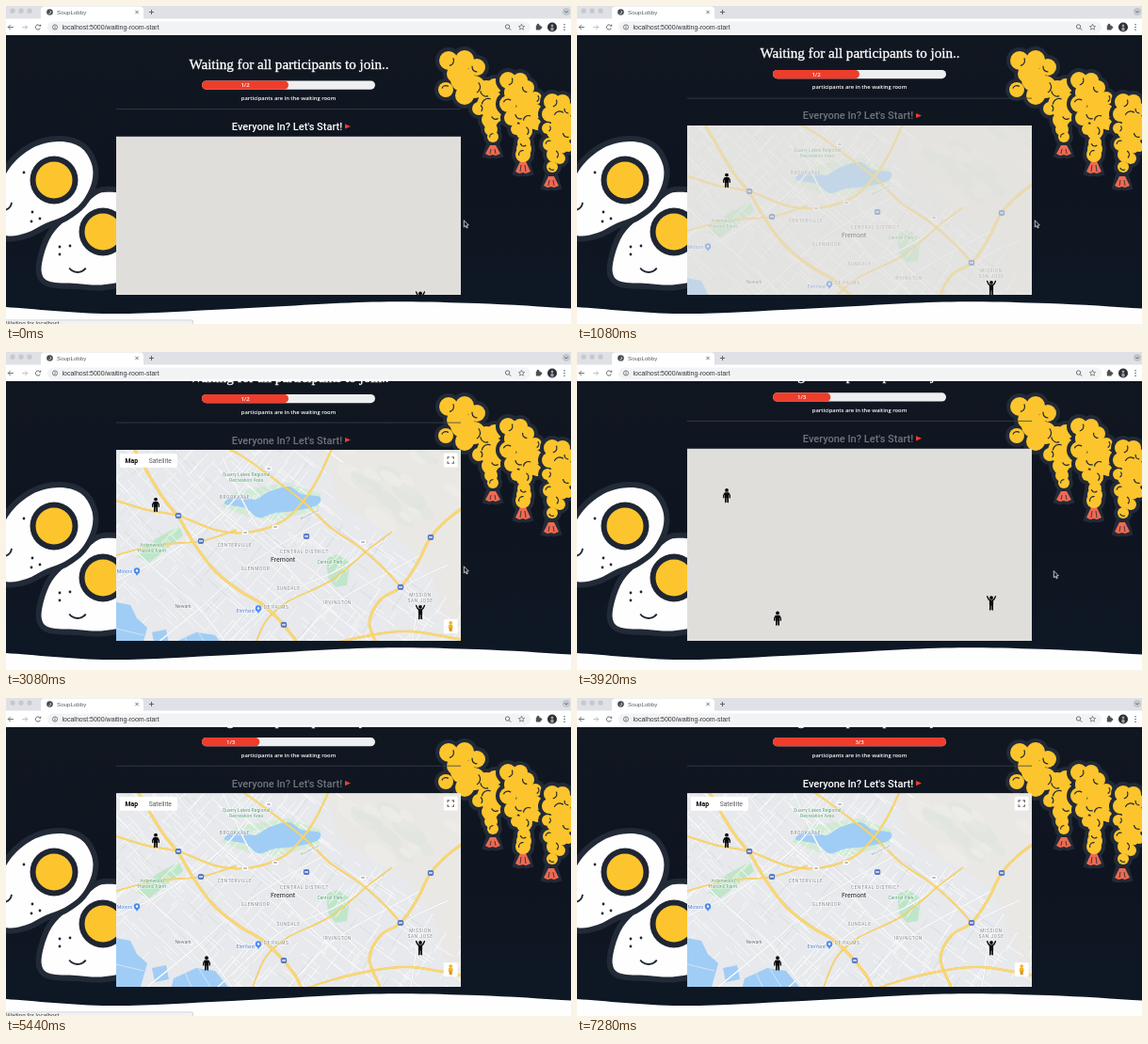
These frames come from a looping animation (600x338 px, 7.32 s). An HTML page with a canvas:

```html
<!DOCTYPE html>
<html lang="en">
<head>
<meta charset="utf-8">
<title>Waiting room</title>
<style>
html, body { margin: 0; width: 100%; height: 100%; overflow: hidden; background: #0f1621; }
canvas { display: block; width: 600px; height: 338px; }
</style>
</head>
<body>
<canvas id="stage"></canvas>
<script>
const W = 600, H = 338, LOOP = 7320, TAU = Math.PI * 2;
const DPR = Math.max(1, window.devicePixelRatio || 1);
const SANS = '"Liberation Sans", Arial, sans-serif';
const ROBOTO = 'Roboto, Arial, sans-serif';
const OPEN = '"Open Sans", sans-serif';
const SERIF = '"Liberation Serif", "Times New Roman", serif';
const INK = '#1f2633', YOLK = '#fcc52d', RED = '#ee3d2c', CORAL = '#ee6a52';

function surface(canvas, w, h) {
  canvas.width = w * DPR;
  canvas.height = h * DPR;
  const c = canvas.getContext('2d');
  c.scale(DPR, DPR);
  return c;
}
const stage = document.getElementById('stage');
const screen = surface(stage, W, H);
let g = screen;

const clamp = v => Math.min(1, Math.max(0, v));
const ease = v => v * v * (3 - 2 * v);

function track(keys, t) {
  let i = keys.length - 1;
  while (i > 0 && keys[i][0] > t) i--;
  const a = keys[i], b = keys[i + 1];
  return b ? a[1] + (b[1] - a[1]) * ease((t - a[0]) / (b[0] - a[0])) : a[1];
}

function seeded(s) {
  return () => (s = (s * 16807) % 2147483647) / 2147483647;
}

// Catmull-Rom curve through a flat list of coordinates.
function curve(p, closed) {
  const n = p.length / 2, path = new Path2D();
  const at = i => {
    const k = closed ? (i + n) % n : Math.min(n - 1, Math.max(0, i));
    return [p[2 * k], p[2 * k + 1]];
  };
  path.moveTo(p[0], p[1]);
  for (let i = 0; i < (closed ? n : n - 1); i++) {
    const [a, b, c, d] = [at(i - 1), at(i), at(i + 1), at(i + 2)];
    path.bezierCurveTo(b[0] + (c[0] - a[0]) / 6, b[1] + (c[1] - a[1]) / 6,
      c[0] - (d[0] - b[0]) / 6, c[1] - (d[1] - b[1]) / 6, c[0], c[1]);
  }
  if (closed) path.closePath();
  return path;
}

function poly(p, fill) {
  g.beginPath();
  for (let i = 0; i < p.length; i += 2) g.lineTo(p[i], p[i + 1]);
  g.closePath();
  g.fillStyle = fill;
  g.fill();
}
function rect(x, y, w, h, fill, r = 0) {
  g.beginPath();
  g.roundRect(x, y, w, h, r);
  g.fillStyle = fill;
  g.fill();
}
function disc(x, y, r, fill) {
  g.beginPath();
  g.arc(x, y, r, 0, TAU);
  g.fillStyle = fill;
  g.fill();
}
function arc(x, y, r, a, b, color, w) {
  g.beginPath();
  g.arc(x, y, r, a, b);
  g.strokeStyle = color;
  g.lineWidth = w;
  g.stroke();
}
function line(p, color, w) {
  g.beginPath();
  for (let i = 0; i < p.length; i += 2) g.lineTo(p[i], p[i + 1]);
  g.strokeStyle = color;
  g.lineWidth = w;
  g.stroke();
}
function text(s, x, y, font, color, align = 'center', spacing = 0) {
  g.font = font;
  g.textAlign = align;
  g.textBaseline = 'alphabetic';
  g.letterSpacing = spacing + 'px';
  g.fillStyle = color;
  g.fillText(s, x, y);
  g.letterSpacing = '0px';
}

// ---- scenery ----
function yolk(x, y) {
  disc(x, y, 25.5, INK);
  disc(x, y, 19.5, YOLK);
}
function egg(points) {
  const path = curve(points, true);
  g.strokeStyle = '#222a37';
  g.lineWidth = 12;
  g.lineJoin = 'round';
  g.stroke(path);
  g.fillStyle = '#fefefe';
  g.fill(path);
}
function freckles(list) {
  for (const [x, y] of list) disc(x, y, 1.4, INK);
}
function eggs() {
  egg([104, 198, 88, 207, 66, 225, 49, 243, 40, 265, 38, 284, 47, 293, 75, 295, 105, 296, 135, 285, 145, 240, 130, 204]);
  yolk(103, 240);
  freckles([[57, 256], [57, 264], [68, 255]]);
  arc(76, 272, 11, 0.65, 2.5, INK, 1.8);
  egg([-10, 203, 4, 172, 28, 151, 56, 144, 79, 150, 91, 168, 91, 188, 80, 209, 62, 223, 42, 231, 22, 241, 0, 244, -14, 230]);
  yolk(51, 185);
  freckles([[19, 177], [28, 219], [36, 226], [27, 229]]);
  arc(-3, 208, 9, 0.1, 1.3, INK, 1.8);
}

const puffs = [
  { tail: [517, 148, 159], blobs: [470,58,10, 487,57,10, 500,65,9, 478,72,10, 467,89,8, 485,78,13, 497,86,12, 487,95,10, 510,90,11, 519,85,8, 512,105,12, 519,100,9, 502,109,7, 514,121,9, 520,116,8, 515,131,7, 517,139,6] },
  { tail: [549, 165, 178], blobs: [533,79,9, 546,79,8, 553,87,8, 540,92,11, 533,104,9, 552,101,11, 562,98,7, 562,112,8, 546,115,9, 537,119,8, 555,122,10, 564,126,6, 550,133,9, 542,131,6, 550,145,7, 550,152,8, 549,158,8] },
  { tail: [579, 181, 193], blobs: [580,102,9, 591,102,8, 597,110,7, 577,115,8, 588,118,11, 598,124,7, 575,130,6, 584,133,10, 596,135,8, 589,147,10, 577,147,7, 597,150,5, 582,158,8, 588,162,6, 580,171,6] }
];
function eachBlob(b, f) {
  for (let i = 0; i < b.length; i += 3) f(b[i], b[i + 1], b[i + 2], i / 3);
}
function tailShape([x, y0, y1], grow, fill) {
  poly([x - 3 - grow, y0 - grow, x + 3 + grow, y0 - grow, x + 8 + grow, y1 - 2 + grow,
    x + 3, y1 + grow, x, y1 - 1 + grow, x - 4, y1 + grow, x - 8 - grow, y1 - 2 + grow], fill);
}
function puff({ tail, blobs }) {
  tailShape(tail, 3.5, '#222a37');
  eachBlob(blobs, (x, y, r) => disc(x, y, r + 4, '#222a37'));
  tailShape(tail, 0, CORAL);
  const [x, y0, y1] = tail;
  line([x - 2, y0 + 4, x - 3, y1 - 2], INK, 0.8);
  line([x + 2, y0 + 4, x + 3, y1 - 2], INK, 0.8);
  eachBlob(blobs, (x, y, r) => disc(x, y, r, YOLK));
  eachBlob(blobs, (x, y, r, i) => {
    if (i % 2 === 0) arc(x, y, r * 0.55, i - 0.5, i + 1.4, INK, 1.2);
  });
}

function backdrop() {
  const sky = g.createLinearGradient(0, 31, 0, H);
  sky.addColorStop(0, '#111721');
  sky.addColorStop(0.5, '#0e1520');
  sky.addColorStop(1, '#0e1825');
  g.fillStyle = sky;
  g.fillRect(0, 0, W, H);
  eggs();
  puffs.forEach(puff);
  const wave = curve([-60, 316, 0, 320, 110, 327, 240, 322, 390, 314.5, 500, 316, 600, 321.5, 660, 325]);
  wave.lineTo(660, 360);
  wave.lineTo(-60, 360);
  g.fillStyle = '#fefefe';
  g.fill(wave);
}

// ---- browser frame ----
function chrome() {
  rect(0, 0, W, 14, '#dfe1e6');
  rect(37, 0.5, 109, 16, '#fff', 4);
  rect(0, 13.5, W, 17.5, '#fff');
  for (const x of [7, 16, 25]) disc(x, 5.2, 2.6, '#c6c8cc');
  disc(46.5, 6.5, 3.3, '#45494e');
  arc(46, 6.5, 1.6, -1, 2, '#fff', 0.8);
  text('SoupLobby', 54, 8.8, '6.2px ' + SANS, '#55595e', 'left');
  cross(139, 6.5, 1.7);
  line([152, 6.5, 157, 6.5], '#55595e', 0.9);
  line([154.5, 4, 154.5, 9], '#55595e', 0.9);
  disc(595, 6, 4, '#c3c6cb');
  line([593.3, 5.3, 595, 7, 596.7, 5.3], '#55595e', 0.8);

  arrow(5, -1, '#5f6368');
  arrow(20, 1, '#b9bcc0');
  arc(34, 22.5, 2.6, 0.4, 5.4, '#5f6368', 0.9);
  poly([34.8, 21.6, 37.2, 19.2, 37.2, 21.8], '#5f6368');
  rect(44, 16.5, 513, 12.5, '#f2f3f5', 6.2);
  arc(52, 22.5, 2.6, 0, TAU, '#5f6368', 0.8);
  line([52, 22, 52, 24.2], '#5f6368', 0.8);
  disc(52, 20.9, 0.5, '#5f6368');
  text('localhost:5000/waiting-room-start', 59.5, 25, '7px ' + SANS, '#34373b', 'left');
  arc(532.6, 22, 2.2, 0, TAU, '#5f6368', 0.9);
  line([534.2, 23.6, 536.2, 25.6], '#5f6368', 1);
  star(547.5, 22.5, 3.3);
  rect(562.8, 20.4, 5, 5, '#4d5156', 0.6);
  disc(565, 20, 1.3, '#4d5156');
  disc(568, 22.8, 1.3, '#4d5156');
  disc(580, 22.5, 5, '#2c2f35');
  disc(580, 21, 1.4, '#9b9ca2');
  rect(578.4, 22.8, 3.2, 3.6, '#9b9ca2', 1.2);
  for (const y of [19.8, 22.5, 25.2]) disc(593, y, 0.8, '#5f6368');
}
function cross(x, y, r) {
  line([x - r, y - r, x + r, y + r], '#55595e', 0.8);
  line([x + r, y - r, x - r, y + r], '#55595e', 0.8);
}
function arrow(x, d, color) {
  line([x - 2.8 * d, 22.5, x + 2.8 * d, 22.5], color, 0.9);
  line([x + 0.3 * d, 20, x + 2.8 * d, 22.5, x + 0.3 * d, 25], color, 0.9);
}
function star(x, y, r) {
  const p = [];
  for (let i = 0; i <= 10; i++) {
    const a = i * Math.PI / 5 - Math.PI / 2, k = i % 2 ? r * 0.45 : r;
    p.push(x + Math.cos(a) * k, y + Math.sin(a) * k);
  }
  line(p, '#5f6368', 0.7);
}

// ---- map tiles, cached; x from 117, y from 80 ----
const MX = 117, MY = 80;
function road(p, w, color = '#fbd873', edge = '#efc455') {
  const path = curve(p);
  g.strokeStyle = edge;
  g.lineWidth = w + 0.5;
  g.stroke(path);
  g.strokeStyle = color;
  g.lineWidth = w;
  g.stroke(path);
}
function shield(x, y) {
  rect(x - 3.2, y - 3, 6.4, 6, '#5677c4', 2);
  rect(x - 1.9, y - 0.8, 3.8, 1.5, '#e8edfa');
}
function routeMark(x, y) {
  rect(x - 3.5, y - 2.2, 7, 4.4, '#fff', 2.2);
  rect(x - 1.8, y - 0.6, 3.6, 1.2, '#8a8f96');
}
function pin(x, y) {
  poly([x - 2.8, y, x + 2.8, y, x, y + 5], '#4a8af0');
  disc(x, y - 0.5, 3.2, '#4a8af0');
  disc(x, y - 0.5, 1.2, '#fff');
}
function streets() {
  const rnd = seeded(4711);
  for (let i = 0; i < 620; i++) {
    const x = 110 + rnd() * 380, y = 78 + rnd() * 235;
    const a = 0.82 - (x - 117) / 1300 + (rnd() < 0.5 ? Math.PI / 2 : 0);
    const len = 8 + rnd() * 26, gray = rnd() < 0.16;
    if ((x > 335 && y < 165 + (x - 335) * 0.25) || (x > 440 && rnd() < 0.6)) continue;
    if (x < 235 && y > 275) continue;
    line([x, y, x + Math.cos(a) * len, y + Math.sin(a) * len], gray ? '#cfd3d9' : '#fbfbfc', gray ? 0.6 : 0.9);
  }
}
function label(s, x, y, color = '#7f848b', size = 5, spacing = 0, weight = 400) {
  g.strokeStyle = 'rgba(255,255,255,.8)';
  g.lineWidth = 1.2;
  g.font = `${weight} ${size}px ${ROBOTO}`;
  g.textAlign = 'center';
  g.letterSpacing = spacing + 'px';
  g.strokeText(s, x, y);
  text(s, x, y, g.font, color, 'center', spacing);
}
function paintMap() {
  rect(MX, MY, 366, 260, '#e7e9ec');
  g.fillStyle = '#e9e8e5';
  g.fill(curve([332, 70, 345, 118, 356, 150, 392, 172, 428, 195, 452, 230, 470, 285, 500, 310, 520, 60], true));
  const rnd = seeded(99);
  for (let i = 0; i < 26; i++) {
    const x = 355 + rnd() * 125, y = 84 + rnd() * 85, r = 4 + rnd() * 10;
    g.beginPath();
    g.ellipse(x, y, r * 1.6, r * 0.7, 0.6, 0, TAU);
    g.fillStyle = i % 2 ? 'rgba(222,229,219,.5)' : 'rgba(238,237,234,.7)';
    g.fill();
  }
  const park = '#bfe6c8', water = '#a0cdf6';
  poly([138, 207, 160, 187, 184, 174, 188, 184, 172, 197, 152, 213], park);
  poly([340, 208, 352, 204, 365, 213, 362, 237, 350, 239, 342, 229], park);
  poly([228, 153, 245, 136, 300, 128, 334, 140, 332, 156, 288, 168, 256, 164], '#d3ebd6');
  streets();
  g.fillStyle = water;
  g.fill(curve([232, 150, 247, 140, 264, 146, 278, 138, 300, 132, 314, 140, 333, 143, 330, 152, 306, 158, 286, 160, 268, 165, 254, 155], true));
  poly([117, 255, 132, 258, 139, 272, 150, 282, 143, 307, 117, 312], water);
  poly([155, 287, 170, 284, 173, 299, 158, 302], water);
  poly([178, 298, 202, 287, 222, 290, 236, 307, 236, 330, 170, 330], water);
  line([117, 283, 146, 290], '#dfeaf3', 0.8);
  line([190, 292, 203, 320], '#dfeaf3', 0.8);
  line([205, 288, 222, 315], '#dfeaf3', 0.8);

  for (const p of [
    [117, 232, 170, 205, 230, 160, 275, 101], [150, 307, 205, 262, 262, 212, 340, 166],
    [225, 307, 290, 250, 350, 222, 400, 190], [300, 307, 345, 260, 390, 232, 440, 205],
    [180, 101, 220, 150, 285, 205, 340, 260, 400, 307], [230, 101, 268, 175, 330, 225, 382, 275],
    [117, 180, 160, 222, 205, 262, 240, 307], [430, 307, 436, 255, 425, 238, 470, 215]
  ]) road(p, 1.1, '#fff', '#d6d9de');
  road([117, 147, 150, 157, 183, 163, 222, 178, 254, 181, 290, 171, 312, 152, 331, 124, 352, 78], 1.6);
  road([208, 78, 248, 98, 282, 122, 318, 150, 345, 176, 375, 196, 402, 220, 419, 239], 1.5);
  road([117, 205, 160, 194, 207, 190, 245, 178], 1.2);
  road([262, 307, 276, 275, 300, 254, 345, 232, 385, 199, 410, 180], 1);
  road([128, 78, 145, 108, 166, 143, 184, 166, 200, 193, 222, 222, 250, 244, 272, 257, 292, 276, 309, 298, 322, 330], 2.4);
  road([495, 148, 470, 166, 451, 186, 436, 215, 419, 239, 398, 252, 386, 276, 394, 300, 410, 330], 2.2);
  road([300, 315, 345, 300, 388, 290, 430, 286, 495, 297], 1.8);

  [[183, 163], [207, 190], [295, 279], [451, 186], [419, 239], [319, 185]].forEach(p => shield(...p));
  [[279, 113], [286, 175], [379, 191], [254, 181]].forEach(p => routeMark(...p));
  const green = '#4d9a70';
  label('Quarry Lakes Regional', 255, 121, green, 5.1);
  label('Recreation Area', 255, 127, green, 5.1);
  label('Ardenwood', 155, 196, green, 5);
  label('Historic Farm', 155, 201.5, green, 5);
  label('Central Park', 344, 213.5, green, 5);
  label('BROOKVALE', 243, 144.5, undefined, 4.8, 0.6);
  label('CENTERVILLE', 243, 195.5, undefined, 4.8, 0.6);
  label('CENTRAL DISTRICT', 317, 202.5, undefined, 4.8, 0.6);
  label('GLENMOOR', 265, 221, undefined, 4.8, 0.6);
  label('SUNDALE', 300, 241.5, undefined, 4.8, 0.6);
  label('IRVINGTON', 352, 257, undefined, 4.8, 0.6);
  label('MISSION', 440, 249, undefined, 4.8, 0.6);
  label('SAN JOSE', 440, 255, undefined, 4.8, 0.6);
  label('DE PALMS', 287, 261.5, undefined, 4.8, 0.5);
  label('Newark', 188, 261, '#666b71', 5);
  label('Fremont', 294, 212, '#3f4348', 7, 0, 500);
  label('Motors', 126, 224, '#4a78d2', 5.2);
  label('ElmYard', 254, 265.5, '#4a78d2', 5.2);
  pin(139, 222);
  pin(268, 262);
  g.save();
  g.translate(322, 161);
  g.rotate(-0.45);
  label('Mission Blvd', 0, 2, '#8b8f95', 3.8);
  g.restore();
}
const tiles = document.createElement('canvas');
g = surface(tiles, 366, 260);
g.translate(-MX, -MY);
paintMap();

const scenery = document.createElement('canvas');
g = surface(scenery, W, H);
backdrop();
g = screen;

// ---- moving parts ----
function limb(p, w) {
  g.lineCap = g.lineJoin = 'round';
  line(p, '#0a0a0a', w);
  g.lineCap = 'butt';
  g.lineJoin = 'miter';
}
function person(x, y, cheer) {
  disc(x, y - 5.6, 1.9, '#0a0a0a');
  rect(x - 2.1, y - 3.2, 4.2, 6, '#0a0a0a', 0.8);
  limb([x - 1.1, y + 2, x - 1.2, y + 7], 1.7);
  limb([x + 1.1, y + 2, x + 1.2, y + 7], 1.7);
  for (const d of [-1, 1])
    limb(cheer ? [x + d, y - 2.4, x + d * 3, y - 4, x + d * 4.4, y - 7]
      : [x + d * 2, y - 2.4, x + d * 3.3, y, x + d * 3.2, y + 2.2], 1.4);
}

function controls(top, full, rest) {
  if (full) {
    rect(464.8, top + 3.5, 14.8, 14.8, '#fff', 1);
    for (const dx of [-1, 1]) for (const dy of [-1, 1]) {
      const x = 472.2 + dx * 3.2, y = top + 10.9 + dy * 3.2;
      line([x - dx * 2, y, x, y, x, y - dy * 2], '#666', 1.1);
    }
  }
  if (!rest) return;
  rect(120.8, top + 3.8, 61, 14.8, '#fff', 1);
  text('Map', 133.3, top + 13.8, '700 6.8px ' + ROBOTO, '#000');
  text('Satellite', 163.8, top + 13.8, '6.8px ' + ROBOTO, '#565656');
  rect(464.8, top + 180, 14.8, 14.8, '#fff', 1);
  disc(472.2, top + 183.9, 1.9, '#f2b32a');
  rect(469.9, top + 185.8, 4.6, 4.4, '#f2b32a', 1);
  rect(470.7, top + 189, 3, 4, '#d9941e', 0.6);
}

function pointer(x, y) {
  const p = [x, y, x, y + 7.2, x + 1.7, y + 5.7, x + 2.8, y + 8.2, x + 4, y + 7.7, x + 2.9, y + 5.3, x + 5, y + 5.1, x, y];
  poly(p, '#15181d');
  line(p, '#e8e8ea', 0.8);
}

const visits = [
  { at: 0, n: 1, of: 2, tiles: 1000, tools: 1300 },
  { at: 3560, n: 1, of: 3, tiles: 4200, tools: 4440 },
  { at: 5560, n: 2, of: 3, tiles: 5880, tools: 6240 },
  { at: 6560, n: 3, of: 3, tiles: 6720, tools: 7000 }
];
const loading = [[0, 480], [3240, 3720], [5200, 5480], [5760, 6760]];
const scrollBefore = [[0, 0], [560, 0], [1080, 11.5], [1560, 34.5]];
const scrollAfter = [[3560, 36.2], [4200, 36.2], [4560, 37.4]];

function page(t) {
  const k = visits.reduce((best, v, i) => (t >= v.at ? i : best), 0), v = visits[k];
  const s = track(k ? scrollAfter : scrollBefore, t);
  const top = 138.6 - s, shift = top - 101.2 + (k ? 0 : 8);

  g.save();
  g.beginPath();
  g.rect(0, 31, W, 276);
  g.clip();
  const title = 'Waiting for all participants to join..';
  text(title, 300.5, 66.5 - s, '15.1px ' + SERIF, '#fff');
  g.strokeStyle = '#fff';
  g.lineWidth = 0.3;
  g.strokeText(title, 300.5, 66.5 - s);
  rect(208, 79.5 - s, 184, 9.2, '#eeeff0', 4.6);
  const w = 184 * v.n / v.of;
  rect(208, 79.5 - s, w, 9.2, RED, 4.6);
  text(`${v.n}/${v.of}`, 208 + w / 2, 86.2 - s, '600 6px ' + OPEN, '#fff');
  text('participants are in the waiting room', 300, 100 - s, '600 5.8px ' + OPEN, '#fff');
  line([117, 109.6 - s, 483, 109.6 - s], '#3a414c', 0.8);

  const lit = k === 3 ? 1 : k ? 0 : 1 - clamp((t - 400) / 200);
  const mix = (a, b) => Math.round(a + (b - a) * lit);
  text("Everyone In? Let's Start!", 298.5, 132 - s, '500 11px ' + ROBOTO,
    `rgb(${mix(112, 255)},${mix(116, 255)},${mix(124, 255)})`);
  poly([360, 125.4 - s, 366, 128 - s, 360, 130.6 - s], RED);

  g.beginPath();
  g.rect(117, top, 366, 307 - top);
  g.clip();
  rect(117, top, 366, 240, '#e0dedb');
  g.globalAlpha = clamp((t - v.tiles) / 180);
  if (g.globalAlpha > 0) g.drawImage(tiles, MX, MY + shift, 366, 260);
  g.globalAlpha = 1;
  if (k || t > 520) person(159, 151.3 + shift);
  person(440, 265.6 + shift, true);
  if (k) person(213, 281.8 + shift);
  controls(top, t > v.tiles + 200, t > v.tools);
  g.restore();
}

function status() {
  rect(-4, 333.6, 203, 12, '#c9cbce', 2);
  rect(-4, 334.2, 202.4, 12, '#f1f2f3', 2);
  text('Waiting for localhost...', 0, 340.3, '6.3px ' + SANS, '#44484c', 'left');
}

function draw(t) {
  g.drawImage(scenery, 0, 0, W, H);
  page(t);
  chrome();
  if (loading.some(([a, b]) => t >= a && t < b)) status();
  if (t < 4300) {
    const m = ease(clamp((t - 3160) / 440));
    pointer(486.3 + 20 * m, 227.8 + 4.8 * m);
  }
}

const start = performance.now();
function tick(now) {
  draw(Math.max(0, now - start) % LOOP);
  requestAnimationFrame(tick);
}
draw(0);
requestAnimationFrame(tick);
</script>
</body>
</html>
```
